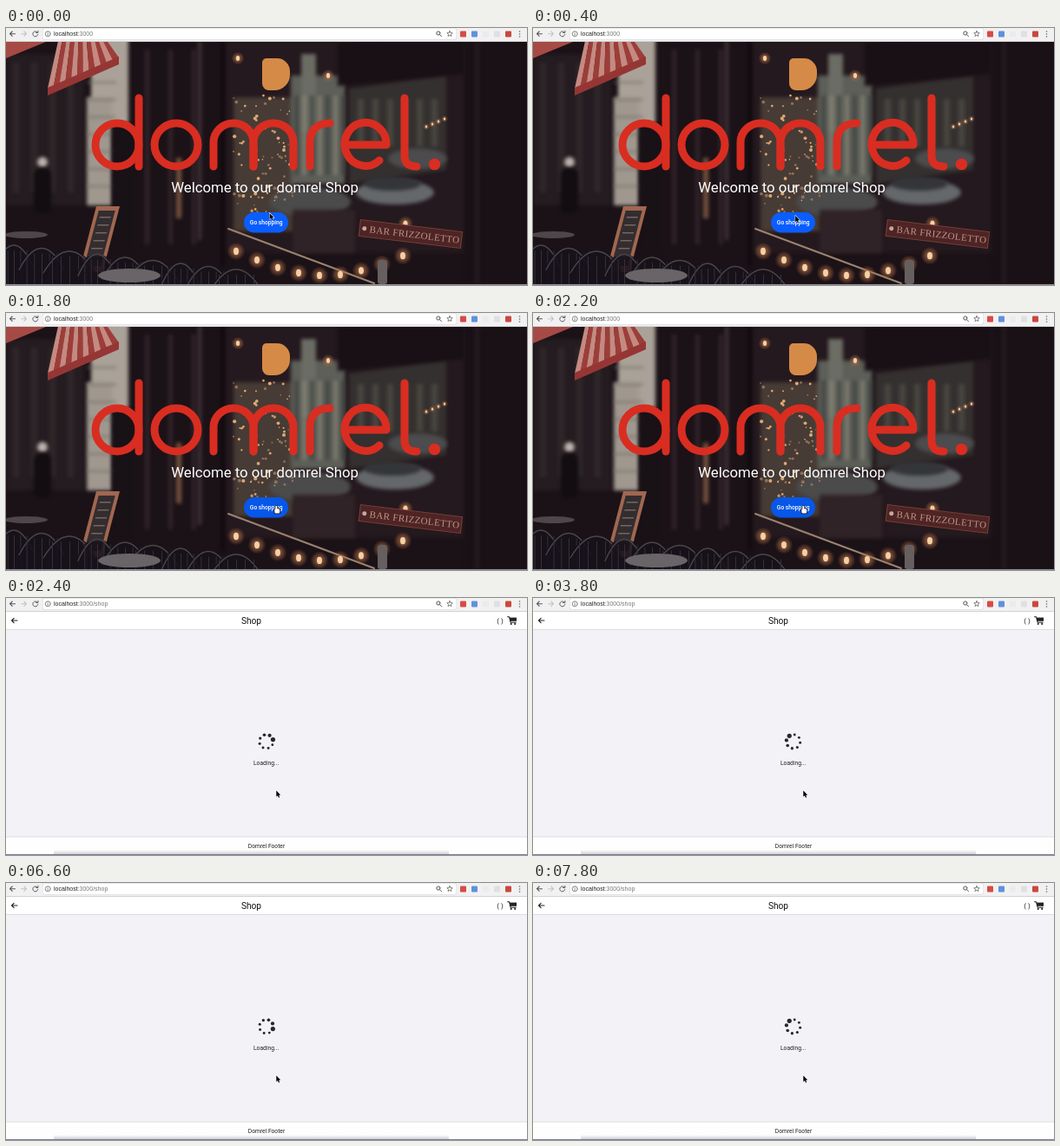
An HTML page with a canvas for the animation above (8000 ms loop, 600 px wide and 297 px high).

```html
<!DOCTYPE html>
<html lang="en">
<head>
<meta charset="utf-8">
<title>Shop</title>
<style>
html, body { margin: 0; width: 100%; height: 100%; overflow: hidden; background: #fff; }
canvas { display: block; width: 100vw; height: 100vh; }
</style>
</head>
<body>
<canvas id="stage" width="600" height="297"></canvas>
<script>
const W = 600, H = 297, TAU = Math.PI * 2;
const LOOP = 8000, STEP = 200, HOVER = 1200, OPEN_SHOP = 2400, SPIN = 2000;
const ROBOTO = 'Roboto, sans-serif', RED = '#d92d21';
const view = document.getElementById('stage').getContext('2d');
const photo = makePhoto();

function repeat(n, fn) {
  for (let i = 0; i < n; i++) fn(i);
}

function box(c, x, y, w, h, fill, r = 0) {
  c.fillStyle = fill;
  c.beginPath();
  c.roundRect(x, y, w, h, r);
  c.fill();
}

// Upright panel whose right side sits `drop` lower than its left
function slab(c, x, y, w, h, drop, fill) {
  c.fillStyle = fill;
  c.beginPath();
  c.moveTo(x, y);
  c.lineTo(x + w, y + drop);
  c.lineTo(x + w, y + drop + h);
  c.lineTo(x, y + h);
  c.fill();
}

function oval(c, x, y, rx, ry, fill) {
  c.fillStyle = fill;
  c.beginPath();
  c.ellipse(x, y, rx, ry, 0, 0, TAU);
  c.fill();
}

function dot(c, x, y, r, fill) { oval(c, x, y, r, r, fill); }

function stroke(c, d, color, width) {
  c.strokeStyle = color;
  c.lineWidth = width;
  c.lineCap = c.lineJoin = 'round';
  c.stroke(new Path2D(d));
}

function ring(c, x, y, r, color, width) {
  c.strokeStyle = color;
  c.lineWidth = width;
  c.beginPath();
  c.arc(x, y, r, 0, TAU);
  c.stroke();
}

function text(c, str, x, y, font, fill, align = 'center') {
  c.font = font;
  c.fillStyle = fill;
  c.textAlign = align;
  c.fillText(str, x, y);
}

function bulb(c, x, y, r) {
  const g = c.createRadialGradient(x, y, 0, x, y, r * 3);
  g.addColorStop(0, '#b06c45');
  g.addColorStop(1, '#b06c4500');
  dot(c, x, y, r * 3, g);
  oval(c, x, y, r * .85, r * 1.2, '#f3d0a6');
}

// Evening street scene in flat soft shapes, drawn once
function makePhoto() {
  const canvas = document.createElement('canvas');
  canvas.width = W;
  canvas.height = H;
  const c = canvas.getContext('2d');
  let seed = 11;
  const rnd = () => (seed = seed * 16807 % 2147483647) / 2147483647;
  box(c, 0, 0, W, H, '#1b1217');
  c.filter = 'blur(2px)';
  house(c);
  shopWindow(c, rnd);
  c.filter = 'blur(.7px)';
  awnings(c);
  lights(c);
  terrace(c);
  c.filter = 'none';
  sign(c);
  return canvas;
}

function house(c) {
  box(c, 0, 30, 90, 175, '#241c20');
  repeat(4, i => box(c, 8 + i * 21, 40, 7, 150, '#30272a'));
  box(c, 98, 10, 43, 100, '#aaa298');
  box(c, 93, 80, 29, 125, '#a0988f');
  repeat(7, i => box(c, 93, 62 + i * 20, 34, 1.5, '#716963'));
  box(c, 122, 112, 24, 150, '#181116');
  repeat(3, i => box(c, 160 + i * 27, 25, 5, 225, '#302429'));
  box(c, 196, 150, 6, 70, '#73513f');
  box(c, 221, 15, 4, 230, '#41343a');
  dot(c, 42, 155, 6, '#bcb2ad');
  box(c, 32, 162, 20, 52, '#120d11', 8);
}

function shopWindow(c, rnd) {
  box(c, 252, 15, 278, 245, '#24191e');
  box(c, 262, 80, 70, 155, '#473b35');
  box(c, 328, 55, 62, 125, '#5d5f58');
  box(c, 340, 30, 17, 90, '#6b6c64');
  repeat(7, i => box(c, 333 + i * 9, 78, 3, 92, i % 2 ? '#898778' : '#383d3c'));
  slab(c, 395, 70, 112, 110, -16, '#34302f');
  repeat(6, i => box(c, 405 + i * 17, 82, 7, 55, '#484640'));
  slab(c, 382, 17, 145, 50, -14, '#181015');
  oval(c, 350, 201, 47, 17, '#4b4b4c');
  oval(c, 448, 190, 45, 14, '#65686b');
  oval(c, 445, 180, 33, 8, '#333539');
  oval(c, 474, 151, 34, 12, '#4c4b4d');
  box(c, 330, 210, 72, 50, '#302327');
  box(c, 247, 15, 5, 260, '#100b0f');
  box(c, 528, 15, 72, 282, '#191116');
  box(c, 540, 15, 5, 282, '#251a20');
  c.filter = 'blur(.6px)';
  repeat(90, () => {
    const x = 262 + rnd() * 68, y = 78 + rnd() * 145;
    dot(c, x, y, .6 + rnd() * 1.5, rnd() > .4 ? '#dda873' : '#927058');
  });
}

function awnings(c) {
  slab(c, 0, 15, 46, 20, -19, '#a64a45');
  repeat(12, i => {
    c.fillStyle = i % 2 ? '#9d3d39' : '#c48a82';
    c.beginPath();
    c.moveTo(60 + i * 4.7, 15);
    c.lineTo(64.7 + i * 4.7, 15);
    c.lineTo(55 + i * 6.8, 67 - i * 3);
    c.lineTo(48 + i * 6.8, 70 - i * 3);
    c.fill();
  });
  slab(c, 48, 69, 82, 9, -36, '#953634');
}

function lights(c) {
  stroke(c, 'M256 232L424 295', '#9c8370', 2);
  repeat(9, i => bulb(c, 265 + i * 24, 258 + 28 * Math.sin(i * Math.PI / 8.5), 3.5));
  bulb(c, 460, 226, 3);
  bulb(c, 267, 35, 2.5);
  bulb(c, 371, 55, 2.5);
  repeat(4, i => bulb(c, 484 + i * 7, 114 - i * 3, 1.3));
  box(c, 295, 35, 32, 37, '#d68a47', [5, 15, 18, 8]);
  box(c, 428, 268, 11, 28, '#65605f', 3);
}

function terrace(c) {
  c.save();
  c.translate(104, 206);
  c.transform(1, 0, -.26, 1, 0, 0);
  box(c, 0, 0, 27, 76, '#a16750');
  box(c, 4, 5, 19, 64, '#332d30');
  repeat(6, i => box(c, 7, 12 + i * 9, 13, 1.5, '#75665f'));
  c.restore();

  repeat(9, i => {
    const x = 9 + i * 32, y = 251 + i * 3.5, r = 22 + i % 3 * 4;
    box(c, x - r, y, r * 2, 60, '#17121be0', [r, r, 0, 0]);
    stroke(c, `M${x - r} ${y + 25}Q${x} ${y - 25} ${x + r} ${y + 25}`, '#4b464b', 1.3);
    repeat(5, k => box(c, x + (k - 2) * r / 3, y + 6, 1, 50, '#343035'));
  });
  oval(c, 142, 286, 36, 8, '#696468');
  oval(c, 23, 239, 25, 4, '#4d464b');
}

function sign(c) {
  c.save();
  c.translate(408, 221);
  c.rotate(.12);
  box(c, 0, 0, 119, 20, '#7a4039');
  box(c, 1, 1, 117, 18, '#4e2424');
  dot(c, 6, 10, 2.5, '#c2aaa0');
  c.letterSpacing = '.4px';
  text(c, 'BAR FRIZZOLETTO', 12, 14, '11px "Liberation Serif", serif', '#bd968a', 'left');
  c.restore();
}

function arrow(x, y, len, color) {
  const head = Math.sign(len) * 2.7;
  stroke(view, `M${x} ${y}h${len}m${-head} -2.7l${head} 2.7l${-head} 2.7`, color, 1.1);
}

function star(x, y, r) {
  let d = '';
  repeat(10, i => {
    const a = i * TAU / 10 - TAU / 4, len = i % 2 ? r * .45 : r;
    d += `${i ? 'L' : 'M'}${x + len * Math.cos(a)} ${y + len * Math.sin(a)}`;
  });
  stroke(view, d + 'Z', '#666', .8);
}

function toolbar(inShop) {
  const c = view, font = '7px "Liberation Sans", sans-serif';
  box(c, 0, 0, W, 16, '#f2f1f2');
  box(c, 0, 15, W, 1, '#d2d1d3');
  box(c, 42, 0, 477, 13.5, '#d5d4d6', 2);
  box(c, 42.5, .5, 476, 12.5, '#fff', 2);
  arrow(10.5, 6.7, -6, '#555');
  arrow(17.5, 6.7, 6, '#c4c4c4');
  stroke(c, 'M36.2 5A3 3 0 1 0 36.8 7.5M36.9 3.3V5.5H34.7', '#5d5d5d', 1);
  ring(c, 48.2, 6.8, 3, '#666', .8);
  stroke(c, 'M48.2 6.5V8.4M48.2 5V5.1', '#666', .8);
  text(c, 'localhost', 55, 9.3, font, '#222', 'left');
  const x = 55 + c.measureText('localhost').width;
  text(c, ':3000' + (inShop ? '/shop' : ''), x, 9.3, font, '#777', 'left');
  ring(c, 497.9, 6, 2.1, '#555', 1);
  stroke(c, 'M499.5 7.7l2 2', '#555', 1);
  star(511, 6.8, 3.4);
  ['#d84a45', '#5f91dc', '#ebebed', '#e0e0e3', '#c9483e'].forEach((color, i) =>
    box(c, 523 + i * 13, 3.5, 7, 7, color, 1));
  repeat(3, i => dot(c, 591.5, 4 + i * 3, .8, '#666'));
}

function wordmark() {
  const top = 110, base = 160, mid = 135, r = 25;
  const ink = d => stroke(view, d, RED, 9);
  const hump = x => ink(`M${x} ${base}V132a23 22 0 0 1 46 0V${base}`);
  ring(view, 128, mid, r, RED, 9);
  ink(`M153 81V${base}`);
  ring(view, 196, mid, r, RED, 9);
  hump(239);
  hump(285);
  ink(`M350 ${base}V133q0 -23 23 ${top - 133}`);
  ink(`M391 ${mid}h47a24 25 0 1 0 -8 18`);
  ink('M459 81V148q0 12 14 12');
  dot(view, 493.5, 157.5, 6.8, RED);
}

function home(t) {
  view.drawImage(photo, 0, 0);
  wordmark();
  text(view, 'Welcome to our domrel Shop', 190.2, 190, '16.75px ' + ROBOTO, '#fff', 'left');
  box(view, 274, 213, 51, 23.5, t >= HOVER ? '#0757e8' : '#0a5dff', 11.75);
  text(view, 'Go shopping', 299.7, 227, '500 6.7px ' + ROBOTO, '#fff');
  box(view, 0, 296, W, 1, '#8d8893');
}

function cart(x, y) {
  stroke(view, `M${x} ${y}h2l1.7 6.5h6`, '#222', 1.1);
  slab(view, x + 2.5, y + .8, 8, 4.2, 0, '#222');
  dot(view, x + 4.2, y + 8.2, 1.1, '#222');
  dot(view, x + 8.7, y + 8.2, 1.1, '#222');
}

function spinner(t) {
  const lead = t / SPIN * TAU - 1.55;
  repeat(8, i => {
    const a = lead - i * TAU / 8, r = 1.4 + 1.2 * .6 ** i;
    dot(view, 299.8 + 8 * Math.cos(a), 165.9 + 8 * Math.sin(a), r, '#282828');
  });
}

function shop(t) {
  const c = view;
  box(c, 0, 15, W, 282, '#f3f2f7');
  box(c, 0, 15, W, 21, '#fff');
  box(c, 0, 36, W, 1, '#dddce0');
  arrow(13, 26, -6.5, '#222');
  text(c, 'Shop', 282.5, 29.7, '10.2px ' + ROBOTO, '#111');
  text(c, '( )', 569, 29.2, '8px ' + ROBOTO, '#222');
  cart(577.5, 21.8);
  spinner(t);
  text(c, 'Loading...', 299.6, 193, '6.7px ' + ROBOTO, '#222');
  box(c, 0, 276, W, 21, '#fefefe');
  box(c, 0, 275.5, W, 1, '#dedde2');
  text(c, 'Domrel Footer', 300, 288.8, '6.7px ' + ROBOTO, '#222');
  const shade = c.createLinearGradient(0, 291, 0, 296);
  shade.addColorStop(0, '#d8d8dc00');
  shade.addColorStop(1, '#d0d0d4');
  box(c, 55, 291, 455, 5, shade);
  box(c, 0, 296, W, 1, '#777f9e');
}

function ease(t, from, to) {
  const k = Math.min(1, Math.max(0, (t - from) / (to - from)));
  return k * k * (3 - 2 * k);
}

// Drifts down onto the button, then across its label
function cursor(t) {
  const c = view, down = ease(t, 0, 1000), across = ease(t, 1000, 1800);
  c.save();
  c.translate(303.5 - 3.8 * down + 11.6 * across, 214 + 8.5 * down);
  if (t >= HOVER && t < OPEN_SHOP) {
    box(c, -1.8, -.5, 3.6, 7, '#111', 1.8);
    box(c, -2.8, 3, 7.6, 6.8, '#111', 2);
    box(c, -1, .3, 2, 6, '#fff', 1);
    box(c, -2, 3.8, 6, 5.2, '#fff', 1.5);
  } else {
    const d = 'M0 0V7.2L1.6 5.7L2.7 8.3L3.9 7.8L2.8 5.3H5Z';
    stroke(c, d, '#fff', 1);
    c.fillStyle = '#000';
    c.fill(new Path2D(d));
  }
  c.restore();
}

function draw(now) {
  const t = Math.floor(now % LOOP / STEP) * STEP;
  const inShop = t >= OPEN_SHOP;
  view.clearRect(0, 0, W, H);
  (inShop ? shop : home)(t);
  toolbar(inShop);
  cursor(t);
}

let start;
function tick(now) {
  start ??= now;
  draw(now - start);
  requestAnimationFrame(tick);
}
draw(0);
requestAnimationFrame(tick);
</script>
</body>
</html>
```
